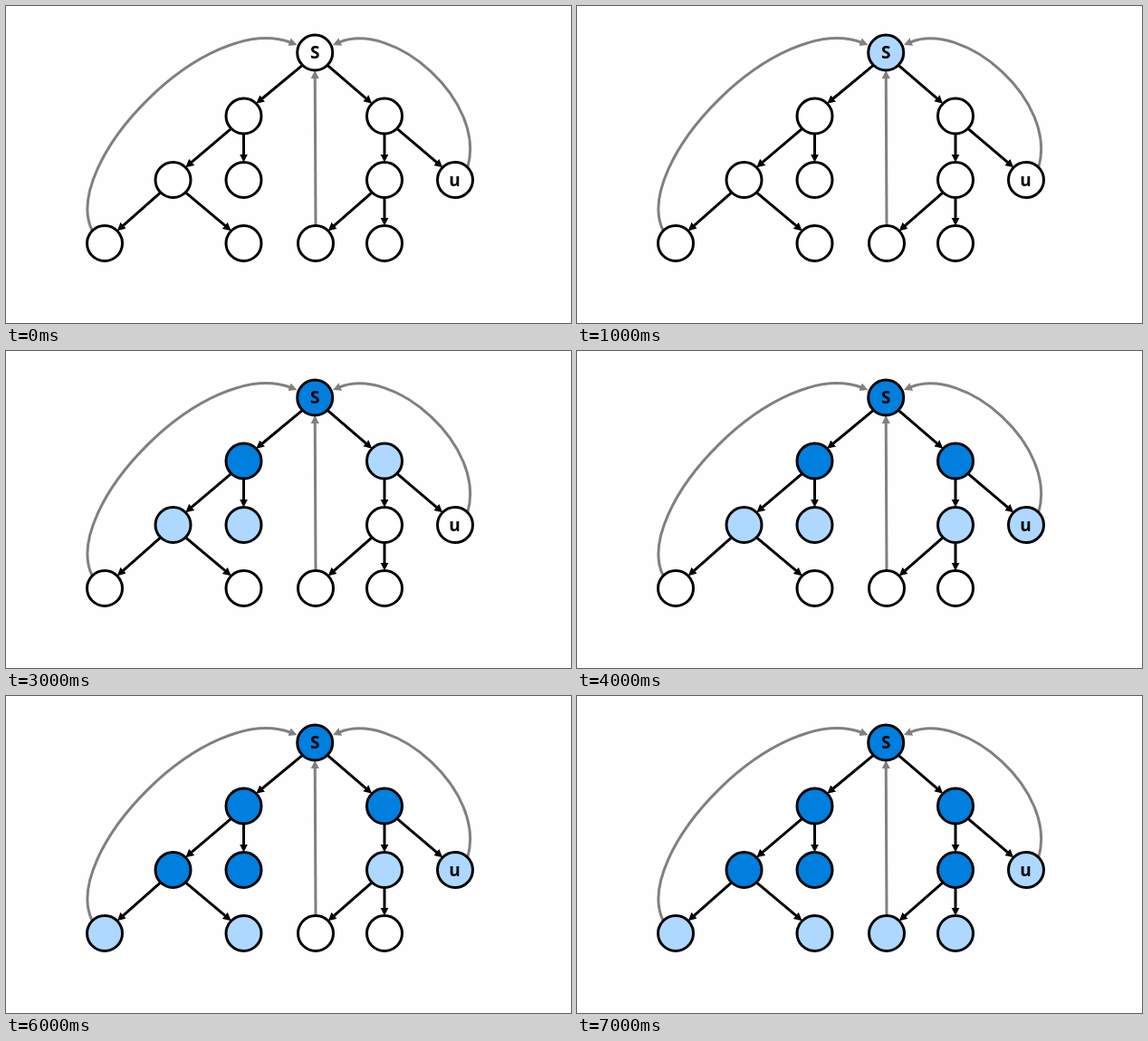
Animation, 624 px wide and 350 px high, one loop 8 s. Source, as an HTML page:

```html
<!DOCTYPE html>
<html lang="en">
<head>
<meta charset="utf-8">
<title>Breadth-first search</title>
<style>
  html, body { margin: 0; width: 100%; height: 100%; overflow: hidden; background: #fefefe; }
  svg { display: block; width: 624px; height: 350px; }
  path { fill: none; stroke-width: 3; }
  circle { fill: #fff; stroke: #000; stroke-width: 3; }
  text { font: bold 19px "Open Sans", "Noto Sans", sans-serif; text-anchor: middle; }
</style>
</head>
<body>
<svg id="stage" viewBox="0 0 624 350"></svg>
<script>
const LOOP = 8000;
const WHITE = '#ffffff', FOUND = '#aed8ff', DONE = '#007fde';
const BLACK = '#000000', GRAY = '#808080';
const RADIUS = 19.5, HEAD = 9, OVERLAP = 2;

// x, y, second when found, second when done (null: not within the loop)
const nodes = {
  S: [341.2, 51.5, 1, 2],
  A: [262.5, 121.5, 2, 3],
  B: [418, 121.5, 2, 4],
  C: [184.5, 192, 3, 5],
  D: [262.5, 192, 3, 6],
  E: [418, 192, 4, 7],
  U: [496, 192, 4, null],
  F: [109, 262, 5, null],
  G: [262.5, 262, 5, null],
  H: [342, 262, 7, null],
  I: [418, 262, 7, null]
};
const edges = ['SA', 'SB', 'AC', 'AD', 'BE', 'BU', 'CF', 'CG', 'EH', 'EI'];
const labels = [['S', 341.2, 58.3], ['u', 495.5, 199.3]];

const stage = document.getElementById('stage');

function add(tag, attrs, parent = stage) {
  const el = document.createElementNS('http://www.w3.org/2000/svg', tag);
  for (const key in attrs) el.setAttribute(key, attrs[key]);
  return parent.appendChild(el);
}

function addHead(id, color) {
  const marker = add('marker', {
    id, markerUnits: 'userSpaceOnUse', orient: 'auto',
    markerWidth: HEAD, markerHeight: 10, refX: OVERLAP, refY: 5
  });
  add('polygon', { points: `0,0.4 ${HEAD},5 0,9.6`, fill: color }, marker);
}

// The stroke stops inside the head so that the tip stays sharp.
function arrow(start, c1, c2, tip, color, head) {
  const dx = tip[0] - c2[0], dy = tip[1] - c2[1];
  const k = (HEAD - OVERLAP) / Math.hypot(dx, dy);
  const end = [tip[0] - dx * k, tip[1] - dy * k];
  const curve = c1 === start ? `L${end}` : `C${c1} ${c2} ${end}`;
  add('path', { d: `M${start}${curve}`, stroke: color, 'marker-end': `url(#${head})` });
}

// Links join the nodes at the nearest multiple of 45 degrees.
function link(from, to, color, head) {
  const [x1, y1] = nodes[from], [x2, y2] = nodes[to];
  const step = Math.PI / 4;
  const angle = Math.round(Math.atan2(y2 - y1, x2 - x1) / step) * step;
  const dx = RADIUS * Math.cos(angle), dy = RADIUS * Math.sin(angle);
  const start = [x1 + dx, y1 + dy];
  arrow(start, start, start, [x2 - dx, y2 - dy], color, head);
}

addHead('dark', BLACK);
addHead('pale', GRAY);

arrow([95.2, 248], [59, 175], [221, 5], [321.5, 43], GRAY, 'pale');
arrow([509.8, 178.2], [531, 105], [428, 15], [361, 43], GRAY, 'pale');
link('H', 'S', GRAY, 'pale');

for (const [x, y, found, done] of Object.values(nodes)) {
  const circle = add('circle', { cx: x, cy: y, r: RADIUS });
  const steps = [[0, WHITE], [found, FOUND]];
  if (done) steps.push([done, DONE]);
  steps.push([LOOP / 1000, done ? DONE : FOUND]);
  circle.animate(
    steps.map(([sec, fill]) => ({ offset: sec * 1000 / LOOP, fill, easing: 'steps(1, end)' })),
    { duration: LOOP, iterations: Infinity }
  );
}

for (const [from, to] of edges) link(from, to, BLACK, 'dark');
for (const [name, x, y] of labels) add('text', { x, y }).textContent = name;

// Start every loop at the same moment.
const now = document.timeline.currentTime || 0;
for (const anim of document.getAnimations()) anim.startTime = now;
</script>
</body>
</html>
```
